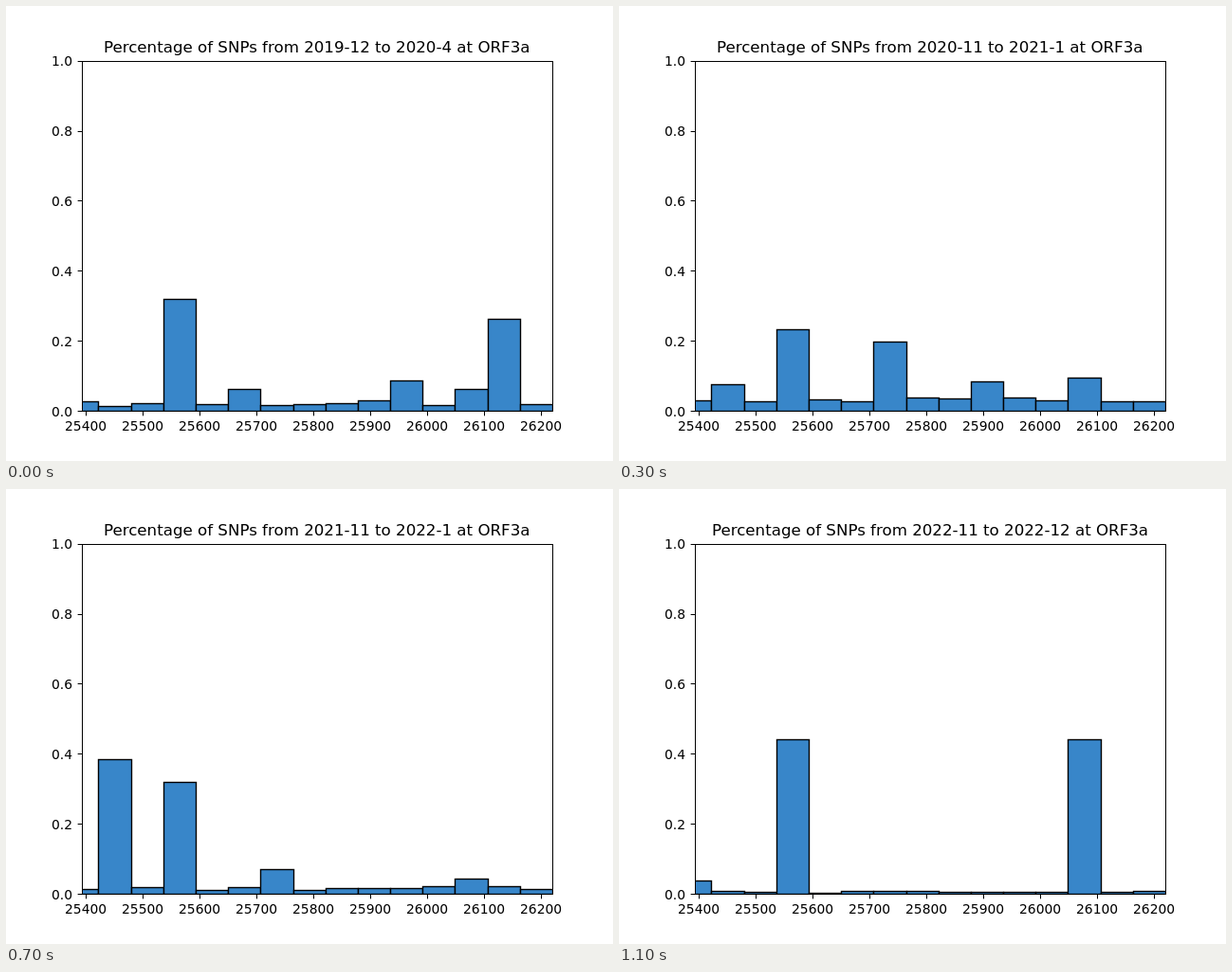
An HTML page with a canvas for the animation above (1.2 s loop, 640x480 px).

```html
<!DOCTYPE html>
<html lang="en">
<head>
<meta charset="utf-8">
<title>SNPs at ORF3a</title>
<style>
html, body { margin: 0; width: 100%; height: 100%; overflow: hidden; background: #fff; }
canvas { display: block; }
</style>
</head>
<body>
<canvas id="chart" width="640" height="480"></canvas>
<script>
const ctx = document.getElementById('chart').getContext('2d');
const STEP = 100, COUNT = 12, BINS = 15;
const LEFT = 80, RIGHT = 576, TOP = 57.6, BOTTOM = 427.2;
const X_MIN = 25393, X_MAX = 26220, BIN = 57, FIRST_EDGE = 25365;
const FONT = '"DejaVu Sans", sans-serif';

// Main peaks of the key periods, as bin: share. Other periods are blended.
const peaks = {
  0: { 3: 0.32, 5: 0.062, 10: 0.087, 12: 0.062, 13: 0.263 },
  1: { 3: 0.28, 6: 0.11, 12: 0.08, 13: 0.14 },
  2: { 1: 1 },
  3: { 1: 0.076, 3: 0.233, 6: 0.198, 9: 0.084, 12: 0.095 },
  5: { 1: 0.647, 3: 0.043, 6: 0.076, 12: 0.078 },
  7: { 1: 0.384, 3: 0.32, 6: 0.07, 12: 0.043 },
  8: { 3: 0.492, 4: 0.051, 12: 0.36 },
  11: { 0: 0.038, 3: 0.441, 12: 0.441 }
};

const snap = v => Math.floor(v + 0.5) + 0.5;
const toX = v => LEFT + (v - X_MIN) / (X_MAX - X_MIN) * (RIGHT - LEFT);
const toY = v => BOTTOM - v * (BOTTOM - TOP);

function random(seed) {
  const s = Math.sin(seed * 12.9898) * 43758.5453;
  return s - Math.floor(s);
}

// Shares add up to 1: what the peaks leave is spread unevenly over the other bins.
function keyShares(i) {
  const main = peaks[i];
  const weights = Array.from({ length: BINS }, (_, n) =>
    n in main ? 0 : 0.6 + 0.8 * random(i * BINS + n + 1));
  const sum = list => list.reduce((a, b) => a + b, 0);
  const rest = 1 - sum(Object.values(main));
  const total = sum(weights);
  return weights.map((w, n) => main[n] ?? rest * w / total);
}

function shares(i) {
  let a = i, b = i;
  while (!peaks[a]) a--;
  while (!peaks[b]) b++;
  const from = keyShares(a), to = keyShares(b);
  const k = a === b ? 0 : (i - a) / (b - a);
  return from.map((v, n) => v + (to[n] - v) * k);
}

function month(n) {
  return `${2020 + Math.floor(n / 12)}-${(n + 12) % 12 + 1}`;
}

function title(i) {
  const from = i === 0 ? -1 : 3 * i + 1;
  const to = Math.min(3 * i + 3, 35);
  return `Percentage of SNPs from ${month(from)} to ${month(to)} at ORF3a`;
}

function line(x1, y1, x2, y2) {
  ctx.beginPath();
  ctx.moveTo(x1, y1);
  ctx.lineTo(x2, y2);
  ctx.stroke();
}

// align: 0.5 centres the text on x, 1 ends it there.
function label(text, x, y, size, align) {
  ctx.font = `${size}px ${FONT}`;
  ctx.fillText(text, Math.round(x - ctx.measureText(text).width * align), y);
}

function drawBars(i) {
  const base = snap(BOTTOM);
  ctx.save();
  ctx.beginPath();
  ctx.rect(LEFT, 58, RIGHT - LEFT, 370);
  ctx.clip();
  ctx.fillStyle = '#3886c9';
  ctx.lineWidth = 1.389;
  shares(i).forEach((v, n) => {
    const x = snap(toX(FIRST_EDGE + n * BIN));
    const w = snap(toX(FIRST_EDGE + (n + 1) * BIN)) - x;
    const y = snap(toY(v));
    ctx.fillRect(x, y, w, base - y);
    ctx.strokeRect(x, y, w, base - y);
  });
  ctx.restore();
}

function drawAxes() {
  const size = 13.889, tick = 4.86;
  ctx.lineWidth = 1;
  for (let v = 25400; v <= 26200; v += 100) {
    const x = toX(v);
    line(snap(x), 427.5, snap(x), 427.5 + tick);
    label(String(v), x, 448, size, 0.5);
  }
  for (let n = 0; n <= 5; n++) {
    const y = toY(n / 5);
    line(80.5, snap(y), 80.5 - tick, snap(y));
    label((n / 5).toFixed(1), LEFT - 2 * tick, Math.round(y + 5.3), size, 1);
  }
  ctx.strokeRect(80.5, 58.5, 496, 369);
}

function draw() {
  const i = Math.floor(performance.now() / STEP) % COUNT;
  ctx.fillStyle = '#fff';
  ctx.fillRect(0, 0, 640, 480);
  ctx.strokeStyle = '#000';
  drawBars(i);
  ctx.fillStyle = '#000';
  drawAxes();
  label(title(i), 327.6, 49, 16.667, 0.5);
  requestAnimationFrame(draw);
}

draw();
</script>
</body>
</html>
```
